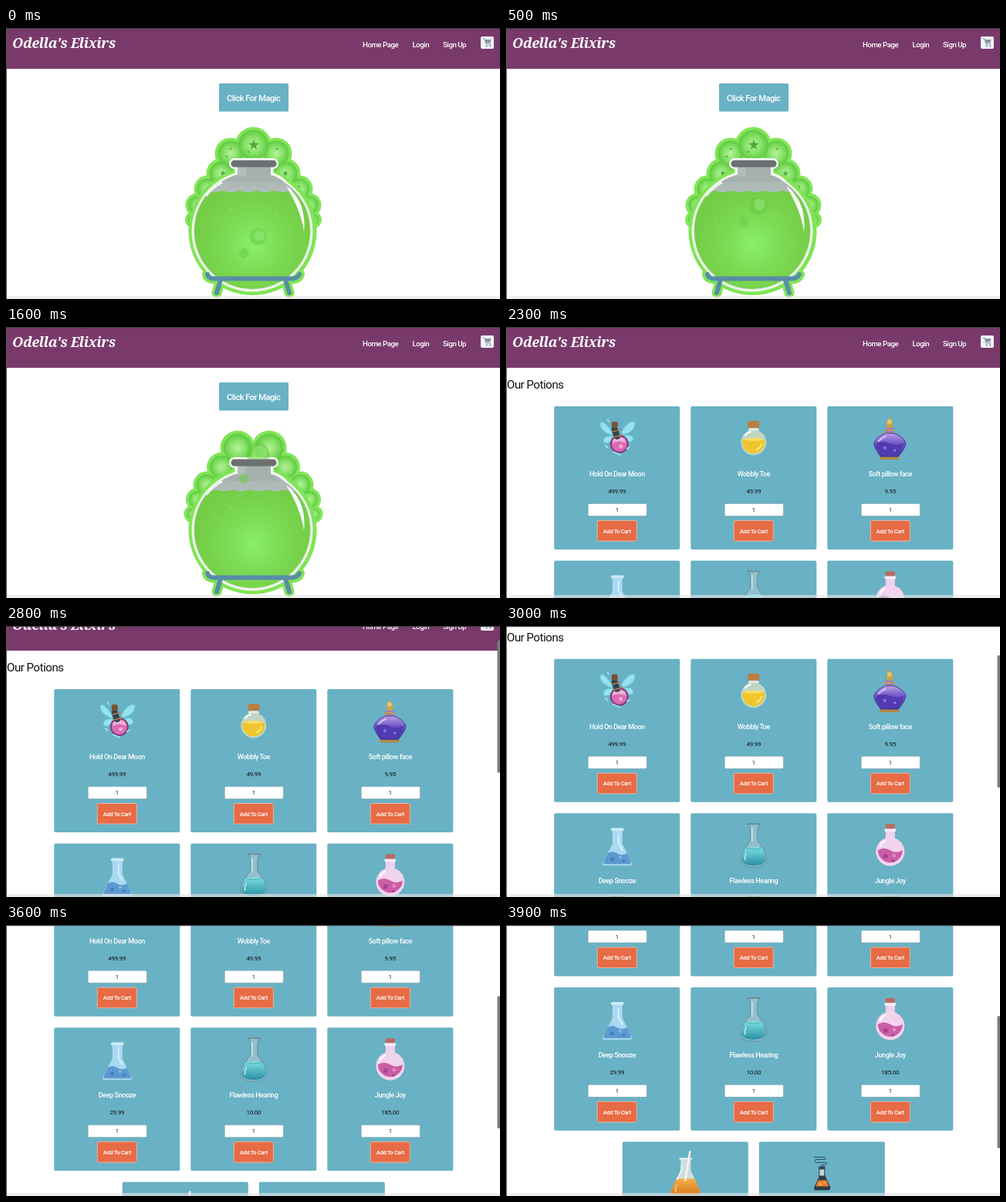
These frames come from a looping animation (640x352 px, 4 s). An HTML page:

```html
<!DOCTYPE html>
<html lang="en">
<head>
<meta charset="utf-8">
<title>Potion shop</title>
<style>
  html, body { margin: 0; width: 100%; height: 100%; overflow: hidden; background: #fff; }
  svg { display: block; width: 640px; height: 352px; }
  text { font-family: Roboto, "Open Sans", sans-serif; font-weight: 500; letter-spacing: -.045em; fill: #fff; }
  .mid { text-anchor: middle; }
  .logo { font: italic 700 18px "Noto Serif", serif; letter-spacing: -.02em; }
  .nav { font-size: 9.6px; }
  .dark { fill: #111; font-weight: 400; letter-spacing: -.035em; }
</style>
</head>
<body>
<svg id="stage" viewBox="0 0 640 352">
  <defs>
    <radialGradient id="puff">
      <stop offset="0" stop-color="#b4f29c"/>
      <stop offset=".55" stop-color="#88e168"/>
      <stop offset="1" stop-color="#5cca3f"/>
    </radialGradient>
    <radialGradient id="brew" gradientUnits="userSpaceOnUse" cx="321" cy="281" r="76">
      <stop offset="0" stop-color="#8aee6c"/>
      <stop offset=".5" stop-color="#7cda53"/>
      <stop offset="1" stop-color="#74cd46"/>
    </radialGradient>
    <linearGradient id="violet" x2="0" y2="1">
      <stop offset="0" stop-color="#b9a0ea"/>
      <stop offset=".45" stop-color="#6b50c4"/>
      <stop offset="1" stop-color="#43309a"/>
    </linearGradient>
    <linearGradient id="teal" x2="0" y2="1">
      <stop offset="0" stop-color="#7fe0e4"/>
      <stop offset="1" stop-color="#2a8fa4"/>
    </linearGradient>
    <linearGradient id="amber" x2="0" y2="1">
      <stop offset="0" stop-color="#f5b04c"/>
      <stop offset="1" stop-color="#d97a1c"/>
    </linearGradient>
    <linearGradient id="glass" x2="0" y2="1">
      <stop offset=".1" stop-color="#aeb9b7"/>
      <stop offset=".3" stop-color="#b9c4c0"/>
      <stop offset=".45" stop-color="#dfe9da"/>
    </linearGradient>
    <clipPath id="bowl"><circle cx="319" cy="264" r="75"/></clipPath>
  </defs>
  <rect width="640" height="352" fill="#fff"/>
  <g id="page">
    <g id="home"></g>
    <g id="shop"></g>
    <g id="header"></g>
  </g>
  <rect id="thumb" x="636.5" width="4" height="172" rx="2" fill="#7c7c7c"/>
  <rect y="348" width="640" height="4" fill="#e4e4e6" opacity=".6"/>
  <rect width="640" height="1.2" fill="#3d3b40"/>
  <rect width="1" height="352" fill="#55525a"/>
</svg>
<script>
const $ = id => document.getElementById(id);
const LOOP = 4000, STEP = 100, SHOP_AT = 2000, SCROLL_AT = 2600, PUFF_AT = 1300;

// Piecewise linear value through [time, value] points
function along(points, t) {
  let [t0, v0] = points[0];
  for (const [t1, v1] of points) {
    if (t <= t1) return t1 === t0 ? v1 : v0 + (v1 - v0) * (t - t0) / (t1 - t0);
    [t0, v0] = [t1, v1];
  }
  return v0;
}

const label = (x, y, size, str, cls = "mid") =>
  `<text class="${cls}" x="${x}" y="${y}" font-size="${size}">${str}</text>`;
const shape = (d, fill, more = "") => `<path d="${d}" fill="${fill}" ${more}/>`;
const line = (d, color, width) =>
  shape(d, "none", `stroke="${color}" stroke-width="${width}" stroke-linecap="round" stroke-linejoin="round"`);
const disc = (x, y, r, fill, more = "") => `<circle cx="${x}" cy="${y}" r="${r}" fill="${fill}" ${more}/>`;
const box = (x, y, w, h, fill, r = 0, more = "") =>
  `<rect x="${x}" y="${y}" width="${w}" height="${h}" rx="${r}" fill="${fill}" ${more}/>`;

function star(x, y, r) {
  let pts = "";
  for (let i = 0; i < 10; i++) {
    const a = i * Math.PI / 5 - Math.PI / 2, q = i % 2 ? r * .42 : r;
    pts += `${(x + q * Math.cos(a)).toFixed(1)},${(y + q * Math.sin(a)).toFixed(1)} `;
  }
  return `<polygon points="${pts}" fill="#4fa83b"/>`;
}

// Cloud of bubbles, mirrored around the bottle axis
function cloud(id, list, stars) {
  const all = list.flatMap(([x, y, r]) => x === 320.5 ? [[x, y, r]] : [[x, y, r], [641 - x, y, r]]);
  const rim = all.map(([x, y, r]) => disc(x, y, r + 2.5, "#82e557")).join("");
  const puffs = all.reverse().map(([x, y, r]) => disc(x, y, r - 1.5, "url(#puff)")).join("");
  return `<g id="${id}">${rim}${puffs}${stars.map(s => star(...s)).join("")}</g>`;
}

$("header").innerHTML =
  box(0, 0, 640, 53, "#793a6b") +
  `<text class="logo" x="8" y="26">Odella's Elixirs</text>` +
  label(462, 25, 9.6, "Home Page", "nav") + label(526.5, 25, 9.6, "Login", "nav") +
  label(566, 25, 9.6, "Sign Up", "nav") +
  box(615, 11, 17, 16, "#f1f3f6", 2) +
  line("M618 14h2l2 7h6", "#75869a", .9) +
  shape("M620.5 15h8l-1.2 4.6h-5.6z", "#8596a8") +
  disc(622.7, 23.4, 1, "#6d7f93") + disc(627.2, 23.4, 1, "#6d7f93");

const legs = "M278 327L273 344M362 327L367 344", rail = "M261 320Q262 325 269 325.5H371Q378 325 380 320";
const neck = "M300 178H343V191Q352 193 360 200H280Q292 193 300 191Z";
$("home").innerHTML =
  box(276, 72, 90, 36.5, "#69b1c4", 1.5) +
  label(320.7, 95, 11.1, "Click For Magic") +
  cloud("puffA",
    [[320.5, 152, 21], [291, 163, 18], [279, 189, 17], [261, 209, 15], [248, 230, 13], [243, 249, 8.5]],
    [[321, 152, 7], [281, 189, 4], [362, 189, 4], [263, 207, 3.5], [379, 207, 3.5],
     [291, 157, 2], [351, 157, 2], [314, 161, 2], [286, 167, 2]]) +
  cloud("puffB",
    [[300, 157, 20], [279, 182, 16.5], [260, 205, 15], [248, 224, 12.5], [242, 243, 9]], []) +
  line(legs, "#80e456", 13) + line(rail, "#80e456", 14) +
  disc(319.5, 264, 83, "#80e456") + disc(319, 264, 78.5, "#eff6eb") +
  line(neck, "#f3f8f1", 7) + line("M296 176H346", "#f3f8f1", 14) +
  disc(319, 264, 76, "url(#glass)") +
  shape(neck, "#a5b1ae") + box(300, 180, 11, 13, "#b3bebb") +
  `<g clip-path="url(#bowl)"><path id="liquid" fill="url(#brew)"/></g>` +
  disc(0, 0, 1, "#66c941", 'id="big" opacity=".5"') + disc(0, 0, 1, "#a5ef8b", 'id="bigLight" opacity=".4"') +
  disc(0, 0, 1, "#6ccd4b", 'id="small" opacity=".6"') +
  [[272, 249], [292, 235], [350, 243], [369, 280], [270, 292], [344, 304], [297, 313]].map(
    ([x, y]) => disc(x, y, .9, "#96e777")).join("") +
  shape("M363 205Q390 226 386 265Q383 239 363 205Z", "#fafdfa") +
  line("M260 217Q267 208 279 201", "#eef3f0", 3) +
  line("M296 176.3H346", "#6d7072", 9) +
  line(legs, "#588da7", 6) + line(rail, "#588da7", 6);

// Bottle pictures: x around the card middle, y from the card top
const art = [
  shape("M-8 31Q-18 18-21 21Q-24 31-6 38M-6 39Q-19 38-17 47Q-12 50-4 42M6 33Q16 17 23 21Q24 33 7 37M8 39Q20 35 21 43Q18 49 8 44",
    "#97e2ee", 'stroke="#68d1e3" stroke-width="1.2"') +
  disc(3, 49, 12, "#7e3f7b") + disc(3, 49, 10, "#dc69b2") + shape("M-6 48Q2 43 12 48L10 42Q2 38-5 43Z", "#eab1d8") +
  line("M-3 30L0 39", "#34434f", 8) + box(-7, 20, 8, 8, "#7a5132", 2) +
  line("M-6 33L5 30M-4 40L7 37", "#b58049", 1.5) + disc(5, 52, 2.5, "#f6a9d6") +
  line("M-15 51l3 3M16 53l-3 2M-12 17l1 3M-5 59l9 4", "#9ae7f1", 1.8),
  box(-6, 24, 12, 14, "#c3d8d5", 1) + disc(0, 47, 16.5, "#bfd6c3") +
  shape("M-14 43A14.5 14.5 0 1 0 14 43Z", "#f1c52d") +
  shape("M-14 43Q0 47 14 43Q0 38-14 43Z", "#f9dd68") +
  line("M-11 38Q-8 34-4 33", "#fff", 2) + line("M4 56Q9 54 10 49", "#fbe786", 2) +
  box(-7.5, 19, 15, 9, "#b97e42", 2) + box(-7, 29, 14, 2.5, "#e3ebe6", 1),
  shape("M-1 13L4 22L2 29H-4L-5 22Z", "#cfa047") + disc(-1, 20, 3, "#e8c56c") +
  shape("M-6 28H4V36H-6Z", "#9c78c5") + line("M-7 31H5M-7 35H5", "#c89b4b", 2) +
  shape("M-6 35H5Q16 39 20 47Q21 53 9 67H-11Q-22 53-21 47Q-17 39-6 35Z", "url(#violet)", 'stroke="#4b3597"') +
  shape("M-18 48Q-8 44 0 48T17 48Q18 53 8 64H-10Q-20 54-18 48Z", "#513bb0") +
  line("M-15 45Q-11 41-6 39", "#ddceff", 1.8) + disc(-7, 54, 2, "#8e76df") + disc(6, 57, 1.5, "#9c86e6") +
  line("M-12 67.5H10", "#b28945", 3.5),
  shape("M-6 21H7V40L19 64Q20 68 16 68H-16Q-20 68-18 64L-6 40Z", "#a9d9f1") +
  shape("M-12 52Q-6 48 0 52T13 52L18 63Q19 66 16 66H-15Q-18 66-17 63Z", "#5d99d1") +
  line("M-6 21H7", "#c8eafa", 4) + line("M2 27V39L7 48", "#d7f0fc", 2) +
  disc(-6, 60, 2.5, "#427ebd") + disc(4, 57, 2, "#82b6e2") + disc(9, 62, 1.8, "#417cb9"),
  shape("M-7 14Q-4 17-4 23V35Q-17 52-17 61Q-15 70 0 70T17 61Q17 52 5 35V23Q5 17 8 14Z", "#92bfc9", 'stroke="#5d8994" stroke-width=".9"') +
  shape("M-11 45Q0 42 11 45Q16 54 16 61Q13 68 0 68T-16 61Q-15 54-11 45Z", "url(#teal)") +
  line("M-8 14H9", "#6c8790", 1.5) + line("M-2 19V36M-10 52Q-12 57-11 61", "#d6f1f3", 1.3) + line("M-10 45Q0 49 10 45", "#49aeba", 1),
  box(-6, 18, 12, 18, "#f0d0ea", 2) + disc(0, 50, 18.5, "#f2d3ed") +
  shape("M-16 48Q-8 43 0 48T16 48A16 16 0 0 1-16 48Z", "#cb5da8") +
  box(-7.5, 20, 15, 4, "#faeaf7", 2) + box(-6, 14, 12, 6, "#b96a60", 1) +
  disc(-6, 56, 3, "#a8428a") + disc(5, 55, 2.3, "#e58cc7") + disc(4, 62, 1.8, "#a8428a") + line("M-13 43Q-11 38-7 36", "#fff", 2),
  shape("M-6 22H7V37L19 64Q20 69 15 69H-16Q-21 68-18 63L-6 37Z", "#d2dedc") +
  shape("M-12 49Q1 46 13 49L19 64Q20 69 15 69H-16Q-21 68-18 63Z", "url(#amber)") +
  line("M-7 22H8", "#eff5f3", 2) + line("M6 13L0 50", "#f7f4ed", 2.5) +
  line("M-5 31V37L-11 49", "#fff", 1.2) + line("M-11 56Q-14 62-12 65", "#fbd28c", 1.5),
  line("M-10 20H2Q6 20 4 23H-8Q-11 26-7 27H5Q9 28 4 30H0V32", "#285365", 1) +
  box(-3.5, 33, 7, 14, "#c4d6d7", 1, 'stroke="#26343c"') +
  shape("M-3 44H4L11 59Q11 63 8 63H-8Q-11 63-10 59Z", "#303b43") +
  shape("M-5 50H6L9 58H-8Z", "#e37e32") + box(-4, 32, 8, 4, "#35434b", 1) +
  disc(-2, 55, 1.5, "#f9b95f") + disc(3, 53, 1, "#f9c574")
];

const items = [
  ["Hold On Dear Moon", "499.99"], ["Wobbly Toe", "49.99"], ["Soft pillow face", "9.95"],
  ["Deep Snooze", "29.99"], ["Flawless Hearing", "10.00"], ["Jungle Joy", "185.00"],
  ["", ""], ["", ""]
];

function card([name, price], i) {
  const row = Math.floor(i / 3), x = (row < 2 ? 143.8 : 232.3) + (i % 3) * 177, y = 103 + row * 200.5;
  return `<g transform="translate(${x} ${y})">` +
    box(-81.5, 0, 163, 186, "#69b1c4", 2) + art[i] +
    label(0, 91, 9, name) + label(0, 113, 8, price, "mid dark") +
    box(-37.5, 126.5, 76, 16, "#fff", 1.5, 'stroke="#8aa5ad" stroke-width=".6"') + label(0, 137, 7.5, "1", "mid dark") +
    box(-25.5, 148.5, 51, 26.5, "#e76b45", 1.5, 'stroke="#e9b39e"') + label(0, 164.7, 7.6, "Add To Cart") + "</g>";
}
$("shop").innerHTML = label(1, 80, 15.2, "Our Potions", "dark") + items.map(card).join("");

const scrollPath = [[SCROLL_AT, 0], [2800, 21], [3000, 60.3], [3400, 135.5], [3900, 222.5]];
const bigPath = [[0, 271], [1000, 191], [1600, 165], [2000, 150]];
const smallPath = [[0, 292], [1000, 212], [1600, 197], [2000, 188]];

function put(id, x, y, r) {
  const c = $(id);
  c.setAttribute("cx", x);
  c.setAttribute("cy", y);
  c.setAttribute("r", r);
}
const show = (id, on) => $(id).setAttribute("visibility", on ? "inherit" : "hidden");

function draw(t) {
  const shop = t >= SHOP_AT, scroll = along(scrollPath, t);
  show("home", !shop);
  show("shop", shop);
  show("thumb", t > SCROLL_AT);
  $("page").setAttribute("transform", `translate(0 ${-scroll})`);
  $("thumb").setAttribute("y", 8.3 + scroll * .493);
  if (shop) {
    show("puffA", false);
    show("puffB", false);
    return;
  }

  show("puffA", t < PUFF_AT);
  show("puffB", t >= PUFF_AT);
  const y = along(bigPath, t), r = along([[0, 11], [1000, 13], [1600, 15]], t);
  put("big", 326.5, y, r);
  put("bigLight", 328.5, y - 2, r * .62);
  put("small", 308, along(smallPath, t), 6.5);
  let d = "M240 345V213";
  for (let x = 240; x <= 400; x += 4) d += `L${x} ${(212.5 + .9 * Math.sin(x / 3.5 + t / 180)).toFixed(2)}`;
  $("liquid").setAttribute("d", d + "V345Z");
}

const start = performance.now();
function tick() {
  const t = (performance.now() - start) % LOOP;
  draw(Math.floor(t / STEP) * STEP);
  requestAnimationFrame(tick);
}
tick();
</script>
</body>
</html>
```
